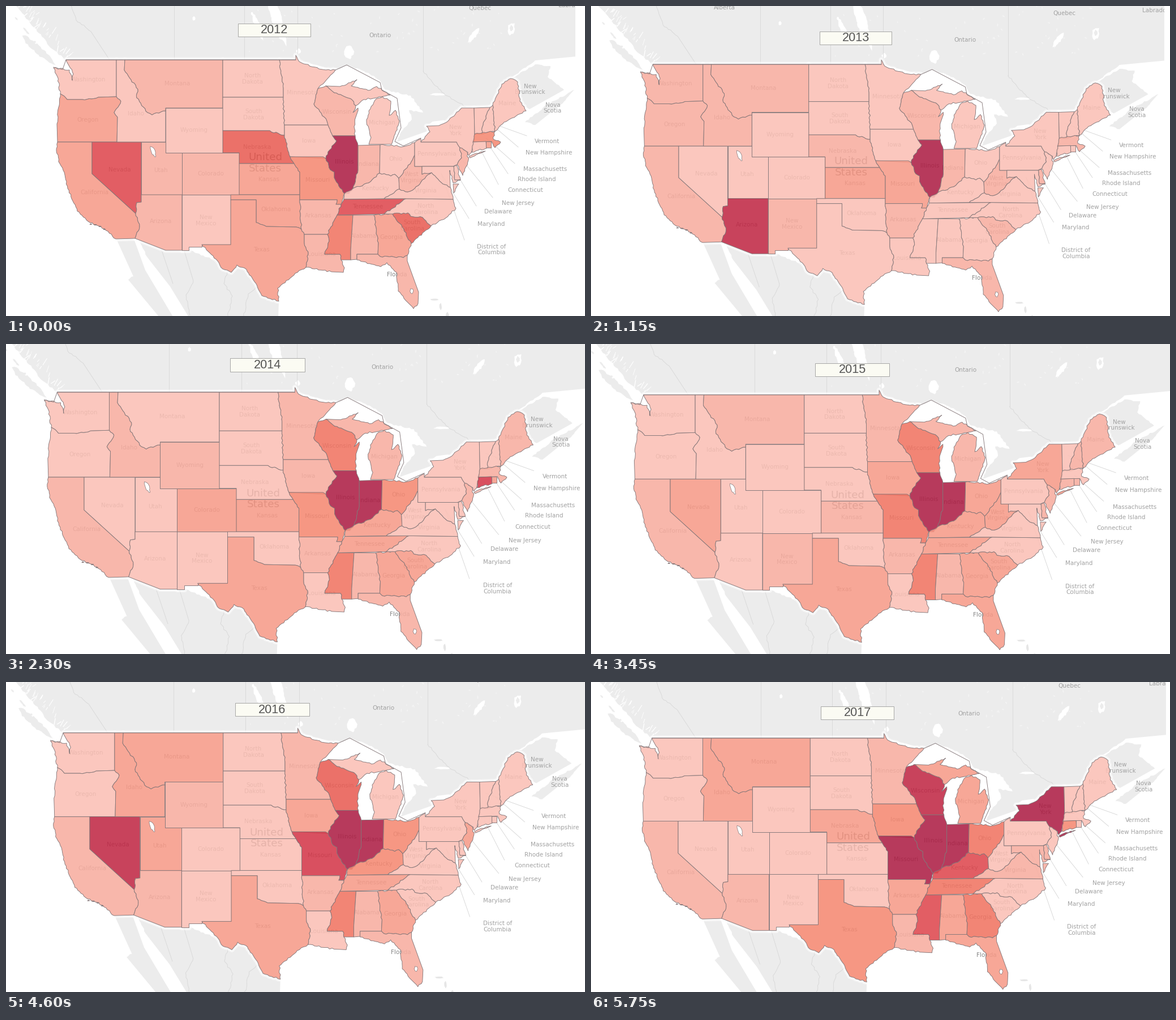
Animation, 1023 px wide and 547 px high, one loop 6.9 s. Source, as a matplotlib script:

```python
import math
import random

import matplotlib.pyplot as plt
import numpy as np
from matplotlib.animation import FuncAnimation
from matplotlib.colors import to_rgb
from matplotlib.patches import Polygon, Rectangle
from matplotlib.transforms import Affine2D

W, H, DPI = 1023, 547, 64
PX = 72 / DPI
OPACITY = 0.86
LAND, BASE, EDGE, GREY = "#ececec", "#f1f1f1", "#85787a", "#a2a2a2"
SHADES = ["#fbc8be", "#f9b7ab", "#f8a797", "#f69783", "#f38575",
          "#ec7169", "#e25e64", "#d95060", "#c9425c", "#b73a5b"]

# Map scale, map origin, corner of the year box, right end of the map
VIEWS = {
    2012: (1.0, 152, 95, 410, 31, 1006),
    2013: (0.9945, 155, 103, 404, 45, 1013),
    2014: (1.0345, 138, 85, 396, 25, W),
    2015: (1.025, 140, 89.7, 396, 33.5, W),
    2016: (1.0205, 148, 89.7, 405, 37, W),
    2017: (1.010, 154, 99, 406, 42.5, 1016),
}
# States above the lightest shade
DARKER = {
    2012: {1: "MT UT CO AZ AR LA WI IN AL FL WV NJ", 2: "OR CA KS OK TX GA RI",
           3: "MO MA", 4: "MS", 5: "NE SC", 6: "NV TN", 9: "IL"},
    2013: {1: "WA OR CA ID MT NE NM AR WI IN FL SC WV MA DE", 2: "KS MO", 8: "AZ", 9: "IL"},
    2014: {1: "CA ID WY MN IA AR MI AL FL ME MA NJ", 2: "CO KS TX KY TN GA SC RI",
           3: "MO OH", 4: "WI MS", 7: "CT", 9: "IL IN"},
    2015: {1: "CA MT KS NM MN AR MI AL NH ME RI CT NJ DE",
           2: "NV IA TX OH KY TN GA FL SC WV NY", 4: "MO WI MS", 9: "IL IN"},
    2016: {1: "CA WY AZ MN AR AL FL", 2: "ID MT UT TX IA TN GA NJ", 3: "OH KY",
           4: "MS", 5: "WI", 7: "MO", 8: "NV", 9: "IL IN"},
    2017: {1: "CA AZ MN LA VA DE MD", 2: "ID MT NE AR MI AL FL", 3: "TX IA CT",
           4: "OH TN GA", 6: "KY MS", 8: "WI", 9: "IL IN NY MO"},
}

fig = plt.figure(figsize=(W / DPI, H / DPI), dpi=DPI, facecolor="white")
ax = fig.add_axes([0, 0, 1, 1])
ax.set(xlim=(0, W), ylim=(H, 0))
ax.axis("off")
view = Affine2D()
on_map = view + ax.transData


def line(*values):
    return list(zip(values[::2], values[1::2]))


def rough(points, closed=True):
    """Wiggle slanted edges, the same way for both neighbours; surveyed ones stay straight."""
    ends = points[1:] + points[:1] if closed else points[1:]
    out = []
    for p, q in zip(points, ends):
        out.append(p)
        size = math.dist(p, q)
        if min(abs(q[0] - p[0]), abs(q[1] - p[1])) < 2 or not 6 < size < 55:
            continue
        (ax0, ay0), (bx, by) = a, b = sorted((p, q))
        rng = random.Random(str((a, b)))
        n = max(2, round(size / 4))
        mids = []
        for k in range(1, n):
            t, off = k / n, rng.uniform(-1.3, 1.3) / size
            mids.append((ax0 + t * (bx - ax0) - off * (by - ay0),
                         ay0 + t * (by - ay0) + off * (bx - ax0)))
        out += mids if a == p else mids[::-1]
    return out if closed else out + points[-1:]


def centroid(points):
    x, y = np.array(points, float).T
    x1, y1 = np.roll(x, -1), np.roll(y, -1)
    cross = x * y1 - x1 * y
    return ((x + x1) @ cross / cross.sum() / 3, (y + y1) @ cross / cross.sum() / 3)


def area(points, color, z, edge="none", width=0.0, alpha=None):
    patch = Polygon(rough(points), closed=True, fc=color, ec=edge, lw=width * PX,
                    alpha=alpha, joinstyle="round", transform=on_map, zorder=z)
    return ax.add_patch(patch)


def blob(x, y, w, h, color="white", z=2, edge="none", tilt=0.0):
    """Uneven ellipse for a lake or an island."""
    rng = random.Random(x * 1000 + y)
    c, s = math.cos(tilt), math.sin(tilt)
    points = []
    for a in np.linspace(0, 2 * math.pi, 14, endpoint=False):
        r = rng.uniform(0.38, 0.6)
        u, v = r * w * math.cos(a), r * h * math.sin(a)
        points.append((x + c * u - s * v, y + s * u + c * v))
    area(points, color, z, edge, 0.7)


def stroke(points, color, z, width=0.9):
    ax.plot(*zip(*points), color=color, lw=width * PX, transform=on_map, zorder=z)


def label(text, x, y, color=GREY, size=10.4):
    ax.text(x, y, text, color=color, fontsize=size * PX, family="DejaVu Sans", ha="center",
            va="center", linespacing=1.1, transform=on_map, zorder=5)


# Canada and Mexico
pacific = line(-25, -40, 18, 0, 50, 38, 82, 76, 106, 95)
great_lakes = line(582, 113, 602, 104, 640, 118, 662, 133, 670, 148, 715, 158, 737, 188,
                   712, 184, 717, 200, 698, 222, 690, 240, 747, 220, 743, 212, 765, 211)
area(pacific + line(512, 95) + great_lakes + line(
    805, 180, 855, 179, 892, 128, 935, 96, 1060, 84, 1060, -40), LAND, 1)
area(line(892, 128, 935, 103, 962, 106, 957, 125, 986, 148, 925, 182, 908, 168), LAND, 1)
area(line(917, 205, 958, 173, 1004, 148, 980, 174, 935, 210), LAND, 1)
area(line(234, 412, 323, 431, 374, 450, 425, 465, 448, 497, 482, 521, 480, 580,
          342, 580, 290, 495, 251, 445), LAND, 1)
area(line(195, 411, 226, 411, 246, 466, 308, 570, 280, 560, 216, 483, 225, 477), LAND, 1)
blob(58, 78, 70, 14, LAND, 1, tilt=0.72)

rng = random.Random(8)
for _ in range(34):
    t = rng.random()
    x, y = 18 + 88 * t + rng.uniform(-6, 16), 95 * t + rng.uniform(-8, 4)
    stroke(line(x, y, x + rng.uniform(2, 7), y - rng.uniform(3, 12)), "white", 2, rng.uniform(0.6, 1.6))
for _ in range(12):
    t = rng.random()
    blob(10 + 60 * t, 12 + 75 * t, rng.uniform(3, 9), 3, LAND, 1, tilt=0.8)
for _ in range(60):
    blob(rng.uniform(430, 900), rng.uniform(-15, 82), rng.uniform(2, 6), 2,
         "#f4f4f4", tilt=rng.uniform(0, 3))

for lake in ((478, 22, 17, 95, -0.3), (445, 36, 10, 48, -0.4), (606, 80, 17, 26, 0),
             (826, 52, 9, 32, 0.6), (893, 40, 13, 22, 0.1), (517, 80, 10, 9, 0),
             (760, 208, 40, 9, -0.2), (763, 156, 28, 4, 0), (332, 22, 5, 8, 0)):
    blob(*lake[:4], tilt=lake[4])
blob(893, 39, 6, 10, LAND)
for x, y, w, h in ((757, 518, 15, 3), (768, 530, 4, 14), (780, 545, 5, 10)):
    blob(x, y, w, h, "#e6e6e6")

for x, foot in ((297, 95), (421, 95), (515, 88), (737, 115)):
    stroke(line(x, -40, x, foot), "#d6d6d6", 2, 0.8)
for border in (line(112, -10, 124, 25, 150, 45, 183, 95), line(737, 115, 770, 152, 812, 178),
               line(275, 431, 295, 490), line(315, 432, 331, 485, 318, 510, 325, 545),
               line(392, 466, 385, 490, 400, 512, 392, 547), line(445, 496, 428, 508, 420, 547)):
    stroke(rough(border, False), "#d6d6d6", 2, 0.8)

# Borders that two states share
columbia = line(96, 155, 108, 165, 135, 165, 163, 161, 195, 160)
snake = line(195, 160, 203, 168, 191, 188, 197, 196, 196, 240)
bitterroot = line(210, 95, 209, 113, 233, 147, 231, 162, 250, 188, 258, 192, 282, 185)
low_colorado = line(239, 346, 231, 347, 229, 366, 236, 389, 228, 410)
red_north = line(483, 95, 490, 145, 490, 161)
missouri = line(492, 210, 492, 228, 498, 255, 502, 266)
kansas_east = line(509, 278, 519, 293, 519, 333)
red_south = line(442, 382, 460, 389, 513, 390, 522, 394)
sabine = line(527, 403, 527, 418, 534, 438, 530, 461)
st_croix = line(551, 146, 544, 173, 567, 203, 569, 210)
wisconsin_sw = line(569, 210, 577, 229)
miss_iowa = line(577, 229, 584, 238, 572, 254, 565, 269)
miss_missouri = line(565, 269, 573, 289, 580, 293, 580, 303, 598, 331)
bootheel = line(585, 342, 583, 350, 592, 350)
miss_memphis = line(592, 350, 585, 369)
miss_delta = line(585, 369, 574, 390, 568, 403)
miss_south = line(568, 403, 571, 415, 563, 438, 590, 438, 592, 448)
wabash = line(622, 246, 622, 290, 613, 322)
ohio_low = line(613, 322, 641, 312, 660, 295)
ohio_mid = line(660, 295, 680, 300, 687, 297, 694, 304)
ohio_high = line(694, 304, 716, 275, 722, 263)
smokies = line(707, 340, 697, 347, 668, 367)
kentucky_east = line(668, 340, 695, 323)
alleghany = line(695, 323, 710, 328, 722, 322, 742, 301, 752, 294)
potomac = line(752, 294, 772, 314, 785, 320)
carolinas = line(683, 367, 710, 365, 715, 371, 736, 373, 751, 388)
savannah = line(683, 367, 700, 390, 716, 419)
chattahoochee = line(650, 369, 658, 418, 657, 438)
florida_north = line(657, 438, 661, 442, 702, 444, 709, 440)
delaware = line(796, 240, 802, 250, 805, 268, 797, 280)
hudson = line(827, 180, 828, 226, 823, 255)
connecticut = line(855, 179, 843, 210, 840, 226)
maine_west = line(860, 175, 864, 221)
up_border = line(565, 141, 580, 153, 612, 166, 618, 176)

states, centers = {}, {}


def state(code, name, points, *islands):
    for outline in (points, *islands):
        area(outline, "none", 3, "white", 9, 0.6)
        area(outline, BASE, 4)
        states.setdefault(code, []).append(area(outline, BASE, 6, EDGE, 0.9))
    centers[code] = centroid(points)
    label(name, *centers[code], "#858585")


def box(left, top, right, bottom):
    return line(left, top, right, top, right, bottom, left, bottom)


state("WA", "Washington", line(106, 95, 195, 95) + columbia[::-1] + line(
    91, 125, 84, 109, 112, 113, 117, 131, 119, 120))
state("OR", "Oregon", columbia + snake[1:] + line(91, 240, 90, 208))
state("CA", "California", line(91, 240, 152, 240, 152, 296) + low_colorado[2:] + line(
    194, 411, 174, 393, 145, 380, 126, 362, 109, 322, 104, 298, 95, 278, 89, 252))
state("NV", "Nevada", line(152, 240, 239, 240) + low_colorado[:3] + line(152, 296))
state("ID", "Idaho", line(195, 95) + bitterroot + line(282, 240) + snake[::-1])
state("MT", "Montana", bitterroot + line(282, 180, 383, 180, 383, 95))
state("WY", "Wyoming", box(282, 180, 383, 259))
state("UT", "Utah", line(239, 240, 282, 240, 282, 259, 311, 259, 311, 333, 239, 333))
state("CO", "Colorado", box(311, 259, 412, 333))
state("AZ", "Arizona", line(239, 333, 311, 333, 311, 431, 282, 431) + low_colorado[::-1])
state("NM", "New\nMexico", line(311, 333, 397, 333, 397, 421, 346, 421, 346, 425, 323, 425,
                                323, 431, 311, 431))
state("ND", "North\nDakota", line(383, 95) + red_north + line(383, 161))
state("SD", "South\nDakota", line(383, 161, 490, 161) + missouri[:2] + line(462, 220, 383, 220))
state("NE", "Nebraska", line(383, 220, 462, 220) + missouri[1:] + line(
    509, 278, 412, 278, 412, 259, 383, 259))
state("KS", "Kansas", line(412, 278) + kansas_east + line(412, 333))
state("OK", "Oklahoma", line(397, 333, 519, 333, 519, 342) + red_south[::-1] + line(
    442, 342, 397, 342))
state("TX", "Texas", line(397, 342, 442, 342) + red_south + sabine + line(
    515, 470, 480, 498, 482, 521, 452, 511, 435, 480, 425, 465, 408, 457, 398, 470,
    383, 464, 374, 450, 346, 421, 397, 421))
state("MN", "Minnesota", line(512, 95, 512, 87, 518, 98, 553, 111, 582, 113) + st_croix
      + line(492, 210) + red_north[::-1])
state("IA", "Iowa", missouri[::-1] + wisconsin_sw + miss_iowa[1:])
state("MO", "Missouri", line(502, 266, 560, 266) + miss_missouri + bootheel[::-1] + line(
    519, 342) + kansas_east[::-1])
state("AR", "Arkansas", line(519, 342) + bootheel + miss_memphis[1:] + miss_delta[1:] + line(
    527, 403, 522, 394))
state("LA", "Louisiana", miss_south + line(598, 462, 596, 470, 575, 469, 545, 464) + sabine[::-1])
state("WI", "Wisconsin", up_border + line(613, 188, 622, 180, 615, 213, 617, 229)
      + wisconsin_sw[::-1] + st_croix[::-1])
state("IL", "Illinois", miss_iowa + miss_missouri[1:] + line(606, 331) + wabash[::-1] + line(617, 229))
state("MI", "Michigan", line(641, 244, 645, 232, 637, 205, 641, 185, 652, 166, 665, 160, 680, 168,
                             677, 193, 688, 184, 695, 203, 681, 244),
      up_border + line(632, 165, 679, 157, 655, 142, 640, 149, 610, 141, 620, 130, 590, 142))
state("IN", "Indiana", wabash + ohio_low[1:] + line(661, 245))
state("OH", "Ohio", line(661, 245, 702, 248, 722, 241) + ohio_high[::-1] + ohio_mid[::-1])
state("KY", "Kentucky", line(598, 331) + ohio_low + ohio_mid[1:] + kentucky_east[::-1] + line(597, 341))
state("TN", "Tennessee", line(597, 341, 620, 341) + smokies + miss_memphis[::-1])
state("MS", "", miss_delta + miss_south[1:] + line(609, 448, 609, 430, 613, 369))
state("AL", "Alabama", line(613, 369) + chattahoochee + line(620, 438, 620, 447, 609, 448, 609, 430))
state("GA", "Georgia", line(650, 369) + savannah + florida_north[::-1] + chattahoochee[::-1])
state("FL", "Florida", line(620, 438) + florida_north + line(
    709, 450, 729, 505, 728, 525, 720, 534, 693, 503, 690, 470, 673, 453, 662, 460, 620, 448))
state("SC", "South\nCarolina", carolinas + savannah[::-1])
state("NC", "North\nCarolina", smokies + carolinas + line(777, 374, 795, 357, 790, 341))
state("VA", "Virginia", kentucky_east + alleghany[1:] + potomac[1:] + line(790, 341, 707, 340),
      line(800, 314, 791, 330, 790, 314))
state("WV", "West\nVirginia", line(722, 283, 735, 283, 735, 297) + alleghany[::-1] + ohio_high)
state("PA", "Pennsylvania", line(722, 241, 733, 234, 733, 240) + delaware + line(790, 283, 722, 283))
state("NY", "New\nYork", line(733, 240, 749, 222, 743, 212, 765, 211, 780, 204, 805, 180)
      + hudson + line(818, 264, 816, 258) + delaware[1::-1],
      line(818, 266, 830, 260, 847, 256, 820, 268))
state("NJ", "", delaware[1:] + line(807, 299, 817, 272, 815, 258))
state("VT", "", hudson[:2] + connecticut[::-1])
state("NH", "", connecticut + maine_west[::-1])
state("ME", "Maine", maine_west[::-1] + line(876, 138, 892, 128, 904, 134, 908, 168, 919, 185, 880, 205))
state("MA", "", line(828, 226, 864, 221, 861, 235, 874, 240, 864, 250, 858, 239, 825, 240))
state("CT", "", line(825, 240, 848, 239, 849, 251, 823, 258))
state("RI", "", box(848, 239, 857, 250))
state("DE", "", line(791, 283, 796, 281, 803, 307, 793, 307))
state("MD", "", line(735, 283, 791, 283, 793, 307, 803, 307, 790, 312, 784, 290) + potomac[::-1]
      + line(735, 297))

stroke(great_lakes[:2] + line(661, 135, 664, 148, 691, 163, 698, 215, 687, 239, 702, 247, 733, 233), EDGE, 7)
stroke(line(84, 108, 100, 112, 106, 95, 512, 95), EDGE, 7)
blob(260, 257, 7, 18, z=7, edge=EDGE, tilt=-0.4)
blob(717, 503, 6, 9, z=7, edge=EDGE)
for k in range(4):
    blob(150 + 8 * k, 385 + k * k, 5, 2, EDGE, 7)

label("United\nStates", 458, 277, "#5c5c5c", 18.3)
for name, x, y in (("Ontario", 661, 52), ("Quebec", 837, 4), ("Alberta", 233, -5.5),
                   ("Labrador", 999, -0.5), ("New\nBrunswick", 926, 147), ("Nova\nScotia", 966, 180)):
    label(name, x, y)

# Eastern labels at sea, each with a line from the middle of its state
for code, name, x, y in (
        ("VT", "Vermont", 956, 239), ("NH", "New Hampshire", 959, 259),
        ("MA", "Massachusetts", 953, 288), ("RI", "Rhode Island", 938, 306),
        ("CT", "Connecticut", 918, 325), ("NJ", "New Jersey", 905, 348),
        ("DE", "Delaware", 870, 363), ("MD", "Maryland", 857, 385),
        ("MD", "District of\nColumbia", 858, 430)):
    label(name, x, y)
    half = 3 * max(map(len, name.split("\n")))
    rise = 10 + 7 * name.count("\n")
    stroke([centers[code], (x - half - 15, y - rise)], "#d2d2d2", 5, 0.8)

margin = ax.add_patch(Rectangle((W, 0), W, H, fc="white", ec="none", zorder=8))
frame = ax.add_patch(Rectangle((0, 0), 1, 1, fc="#fbfbf3", ec="#a0a0a0", lw=0.9 * PX, zorder=9))
year_text = ax.text(0, 0, "", color="#555555", fontsize=21.6 * PX, family="Liberation Sans",
                    ha="center", va="center", zorder=10)


def tint(shade):
    """Fill that gives the wanted shade once blended over the base land."""
    wanted, under = np.array(to_rgb(SHADES[shade])), np.array(to_rgb(BASE))
    return (*np.clip((wanted - (1 - OPACITY) * under) / OPACITY, 0, 1), OPACITY)


def draw(i):
    year = 2012 + i
    scale, x0, y0, left, top, end = VIEWS[year]
    view.clear().translate(-152, -95).scale(scale).translate(x0, y0)
    shades = {code: s for s, codes in DARKER[year].items() for code in codes.split()}
    for code, patches in states.items():
        for patch in patches:
            patch.set_facecolor(tint(shades.get(code, 0)))
    width, height = 128 * scale, 23 * scale
    frame.set_bounds(left, top, width, height)
    year_text.set_position((left + width / 2, top + height / 2 + 0.5))
    year_text.set_text(str(year))
    margin.set_x(end)
    return []


anim = FuncAnimation(fig, draw, frames=len(VIEWS), interval=1150, repeat=True, repeat_delay=0)
plt.show()
```
